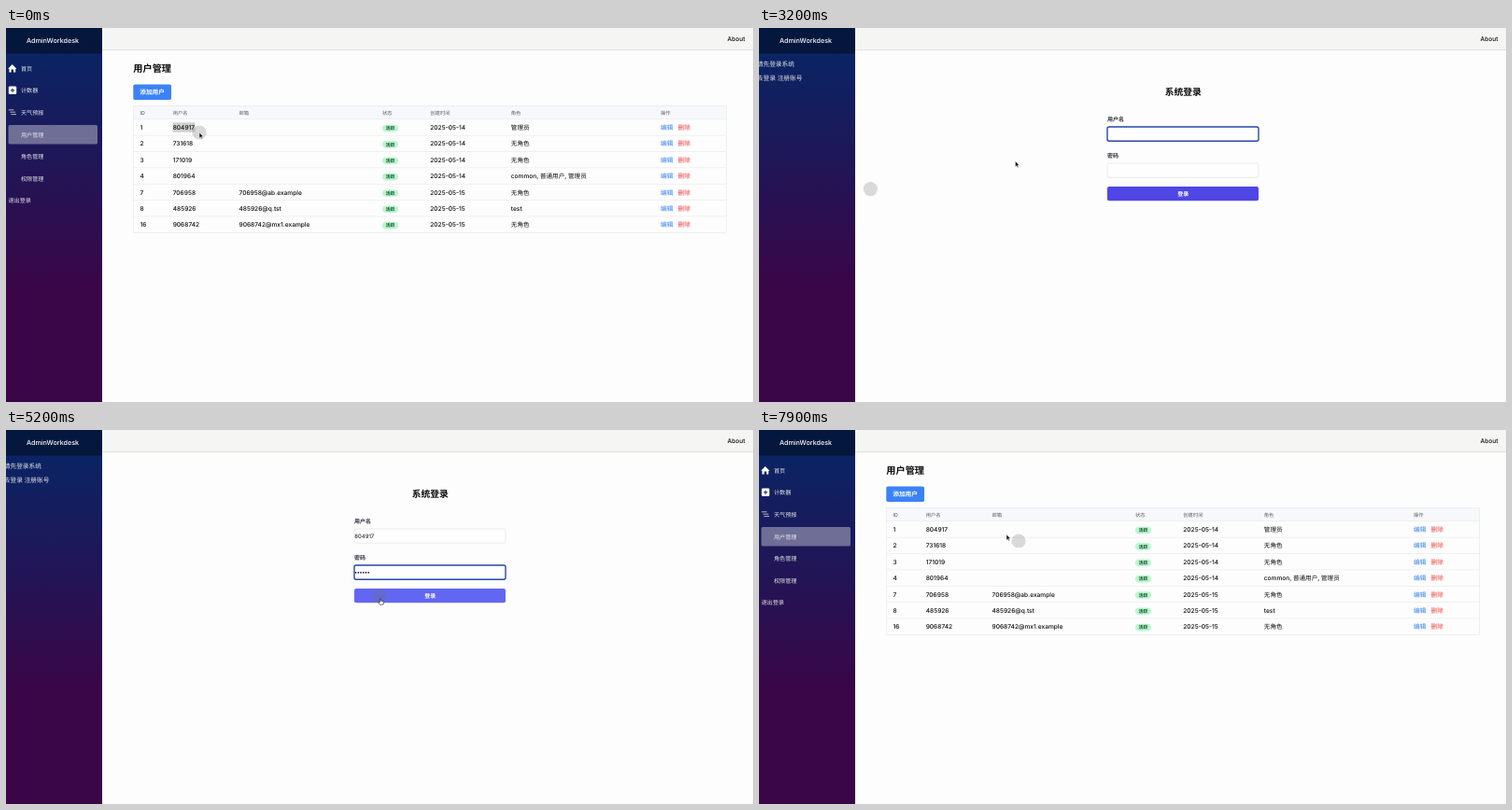
An HTML page for the animation above (8000 ms loop, 800 by 401 pixels).

```html
<!DOCTYPE html>
<html lang="zh-CN">
<head>
<meta charset="utf-8">
<title>用户管理</title>
<style>
  html, body { margin: 0; width: 100%; height: 100%; overflow: hidden; background: #fdfdfd; }
  svg { display: block; width: 800px; height: 401px; }
  text {
    font-family: Inter, "Noto Sans CJK SC", "Noto Sans CJK", sans-serif;
    text-rendering: geometricPrecision;
    white-space: pre;
  }
</style>
</head>
<body>
<svg id="stage" viewBox="0 0 800 401" xmlns="http://www.w3.org/2000/svg"></svg>
<script>
const LOOP = 8000;
const LOGIN_AT = 3000, HOME_AT = 5500, USERS_AT = 7500;
const INK = '#0c0c0e', LINE = '#e5e7eb', PALE = '#e6e6ea';
const ACCOUNT = '804917';

const stage = document.getElementById('stage');

// Text is placed by the vertical middle of its line.
const text = (x, mid, size, str, fill = INK, weight = 500, more = '') =>
  `<text x="${x}" y="${(mid + size * .36).toFixed(2)}" font-size="${size}" fill="${fill}" font-weight="${weight}" ${more}>${str}</text>`;
const rect = (x, y, w, h, fill, more = '') =>
  `<rect x="${x}" y="${y}" width="${w}" height="${h}" fill="${fill}" ${more}/>`;
const path = (d, more) => `<path d="${d}" ${more}/>`;
const group = (id, body) => `<g id="${id}">${body}</g>`;
const middle = 'text-anchor="middle"';

const navItems = [
  { label: '首页', link: '' },
  { label: '计数器', link: 'counter' },
  { label: '天气预报', link: 'weather' },
  { label: '用户管理', link: 'admin/users' },
  { label: '角色管理', link: 'admin/roles' },
  { label: '权限管理', link: 'admin/perms' },
  { label: '退出登录', link: 'auth/logout' }
];
const navMid = i => 43.5 + 23.6 * i;

function frameParts() {
  return `<defs><linearGradient id="side" x1="0" y1="0" x2="0" y2="1">
      <stop offset="0" stop-color="#052767"/><stop offset=".7" stop-color="#3a0647"/>
    </linearGradient></defs>` +
    rect(0, 0, 800, 401, '#fdfdfd') +
    rect(103, 0, 697, 23, '#f5f5f4') +
    rect(103, 23, 697, .7, '#d6d5d5') +
    text(791.5, 11.7, 6.6, 'About', INK, 500, 'text-anchor="end"') +
    rect(0, 0, 103, 401, 'url(#side)') +
    rect(0, 0, 103, 27.5, '#000', 'fill-opacity=".4"') +
    text(50, 13, 7.2, 'AdminWorkdesk', '#fff', 500, middle);
}

function navParts() {
  const icons =
    path('M2.2 43.4L6.7 39L11.2 43.4L10.2 44V47.4H8V44.4H5.6V47.4H3.4V44Z', 'fill="#fff"') +
    rect(2.8, 62.6, 8.4, 8.4, '#fff', 'rx="1.2"') +
    path('M7 64.7V68.9M4.9 66.8H9.1', 'stroke="#10205a" stroke-width="1"') +
    path('M2.8 87.8H8.4M4.4 90.2H10.2M5.4 92.6H11', 'stroke="#c4c6d2" stroke-width=".9"');
  const labels = navItems.map((item, i) =>
    text(i === 6 ? 2.5 : 16, navMid(i), 6.1, item.label, '#e6e6e8')).join('');
  return rect(2.5, 0, 95.5, 20.4, '#fff', 'rx="1.6" id="hover" fill-opacity=".1"') +
    rect(2.5, 0, 95.5, 20.4, '#fff', 'rx="1.6" id="active" fill-opacity=".37"') +
    icons + labels;
}

function usersParts() {
  const cols = [143.5, 178.7, 249.5, 403, 454.3, 540.8, 701];
  const heads = ['ID', '用户名', '邮箱', '状态', '创建时间', '角色', '操作'];
  const rows = [
    [1, ACCOUNT, '', 14, '管理员'],
    [2, '731618', '', 14, '无角色'],
    [3, '171019', '', 14, '无角色'],
    [4, '801964', '', 14, 'common, 普通用户, 管理员'],
    [7, '706958', '706958@ab.example', 15, '无角色'],
    [8, '485926', '485926@q.tst', 15, 'test'],
    [16, '9068742', '9068742@mx1.example', 15, '无角色']
  ];
  const size = 6.6;
  let out = text(136.3, 43.7, 10.2, '用户管理', INK, 700) +
    rect(136.3, 60.5, 40.7, 16.5, '#3b82f6', 'rx="1.8"') +
    text(156.6, 68.8, 6.7, '添加用户', '#fff', 600, middle) +
    rect(136.5, 83.5, 635, 14, '#f7f8fb') +
    rect(136.5, 83.5, 635, 136, 'none', `stroke="${LINE}" stroke-width=".6"`) +
    heads.map((h, i) => text(cols[i], 91, 5.3, h, '#5c626e', 500)).join('') +
    rect(178.5, 101.3, 24, 10.4, '#d0d0d0', 'id="selection"');
  rows.forEach(([id, name, mail, day, role], i) => {
    const y = 106.7 + 17.36 * i;
    out += rect(136.5, y - 9.2, 635, .6, LINE) +
      text(cols[0], y, size, id) +
      text(cols[1], y, size, name) +
      text(cols[2], y, size, mail) +
      rect(cols[3], y - 3, 17, 7.6, '#bbf7d0', 'rx="3.8"') +
      text(cols[3] + 8.5, y + .8, 5, '活跃', '#14532d', 600, middle) +
      text(cols[4], y, size, '2025-05-' + day) +
      text(cols[5], y, size, role) +
      text(cols[6], y, 6.7, '编辑', '#2f7df0') +
      text(719.5, y, 6.7, '删除', '#ee4040');
  });
  return out;
}

function loginParts() {
  const box = (id, y) => rect(373, y, 162, 15.2, '#fefefe', `rx="2" id="${id}"`);
  let dots = '';
  for (let i = 0; i < 6; i++) dots += `<circle class="dot" cx="${374.6 + 2.72 * i}" cy="152.8" r=".85" fill="${INK}"/>`;
  return text(454.3, 68.6, 9.8, '系统登录', INK, 700, middle) +
    text(373, 97.7, 6, '用户名', '#2a303c', 600) +
    text(373, 136.5, 6, '密码', '#2a303c', 600) +
    box('nameBox', 106) + box('passBox', 145) +
    text(373.3, 113.7, 6, '', INK, 400, 'id="typed"') + dots +
    rect(394.4, 110.2, .6, 7, INK, 'id="caret"') +
    rect(373, 170, 162, 15.2, '#4f46e5', 'rx="2" id="submit"') +
    text(454.2, 177.8, 6, '登录', '#fff', 600, middle);
}

const guestParts = () =>
  text(-2.2, 38.7, 6.7, '请先登录系统', '#e6e6e8') +
  text(-2.2, 54, 6.7, '去登录 注册账号', '#e6e6e8');

const homeParts = () =>
  rect(116.5, 23.6, 675, 24, '#d1fae0', 'rx="2" stroke="#92e6ae" stroke-width=".8"') +
  text(124, 35.7, 6.7, '您有权限访问客户数据。');

const statusParts = () =>
  rect(-3, 393, 70, 10, '#dcdedc', 'rx="1.6" stroke="#b4b4b4" stroke-width=".5"') +
  text(-1, 397, 5, '', '#4a4a4a', 400, 'id="address"');

const pointerParts = () =>
  '<circle id="halo" r="7.6" fill="#707070" fill-opacity=".25"/>' +
  group('arrow', path('M0 0V6.2L1.5 4.9L2.5 7.1L3.5 6.7L2.5 4.5H4.4Z',
    'fill="#111" stroke="#fff" stroke-width=".5"')) +
  group('hand', path('M-.6 0Q0 -.7 .6 0V2.2L3 2.8Q3.7 3.2 3.5 4L2.9 6.2H-.6L-2.4 3.7Q-2.2 2.8 -.6 3.8Z',
    'fill="#fff" stroke="#111" stroke-width=".6"')) +
  group('beam', path('M-1.2 -3Q0 -3 0 -2.3V2.3Q0 3 -1.2 3M1.2 -3Q0 -3 0 -2.3M0 2.3Q0 3 1.2 3',
    'fill="none" stroke="#222" stroke-width=".7"'));

stage.innerHTML = frameParts() + group('nav', navParts()) + group('guest', guestParts()) +
  group('users', usersParts()) + group('login', loginParts()) + group('home', homeParts()) +
  group('status', statusParts()) + pointerParts();

const el = {};
stage.querySelectorAll('[id]').forEach(n => el[n.id] = n);
const dots = [...stage.querySelectorAll('.dot')];

// Pointer path: time, x, y
const trail = [
  [0, 207, 112], [500, 207, 112], [1000, 198, 116], [1500, 186, 126], [1850, 150, 150],
  [2200, 44, 187], [3000, 44, 187], [3350, 424, 114], [3700, 424, 114], [3800, 420, 120.5],
  [4000, 408, 152], [4800, 404, 153], [5100, 400, 178], [5200, 401, 181], [5450, 401, 181],
  [5780, 214, 108], [6500, 214, 108], [7000, 36, 117], [7500, 36, 117],
  [7800, 278, 119], [7900, 265, 112], [8000, 258, 109]
];

function pointerAt(t) {
  t = Math.max(0, t);
  const i = Math.max(1, trail.findIndex(p => p[0] > t));
  const [t0, x0, y0] = trail[i - 1], [t1, x1, y1] = trail[i];
  const u = (t - t0) / (t1 - t0), k = u * u * (3 - 2 * u);
  return [x0 + (x1 - x0) * k, y0 + (y1 - y0) * k];
}

const show = (node, on) => node.setAttribute('display', on ? 'inline' : 'none');
const move = (node, [x, y]) => node.setAttribute('transform', `translate(${x.toFixed(2)} ${y.toFixed(2)})`);
const typedCount = (t, start, step) => Math.max(0, Math.min(6, Math.floor((t - start) / step) + 1));

function outline(node, focused) {
  node.setAttribute('stroke', focused ? '#2846a6' : PALE);
  node.setAttribute('stroke-width', focused ? 1.4 : .8);
}

function drawNav(scene, x, y) {
  const over = scene === 'login' || x < 2 || x > 98 ? -1
    : navItems.findIndex((_, i) => Math.abs(y - navMid(i)) <= 10.2);
  const active = scene === 'home' ? 0 : 3;
  el.active.setAttribute('y', navMid(active) - 10.2);
  show(el.hover, over >= 0 && over !== active);
  if (over >= 0) {
    el.hover.setAttribute('y', navMid(over) - 10.2);
    el.address.textContent = 'devserver:7340/' + navItems[over].link;
  }
  show(el.status, over >= 0);
  return over >= 0;
}

function drawLogin(t, x, y) {
  const inside = x > 373 && x < 535;
  const onPass = t >= 4000;
  const onButton = inside && y > 170 && y < 186;
  const count = typedCount(t, 3250, 80), passCount = typedCount(t, 4200, 100);
  el.typed.textContent = ACCOUNT.slice(0, count);
  dots.forEach((d, i) => show(d, i < passCount));
  outline(el.nameBox, !onPass);
  outline(el.passBox, onPass);
  el.caret.setAttribute('x', onPass ? 374 + 2.72 * passCount : 373.6 + 3.5 * count);
  el.caret.setAttribute('y', onPass ? 149.3 : 110.2);
  show(el.caret, t % 1000 >= 500);
  el.submit.setAttribute('fill', onButton ? '#6366f1' : '#4f46e5');
  if (onButton) return 'hand';
  return inside && (y > 105 && y < 122 || y > 144 && y < 161) ? 'beam' : 'arrow';
}

function draw(t) {
  const scene = t < LOGIN_AT || t >= USERS_AT ? 'users' : t < HOME_AT ? 'login' : 'home';
  const spot = pointerAt(t), [x, y] = spot;
  for (const id of ['users', 'login', 'home']) show(el[id], id === scene);
  show(el.nav, scene !== 'login');
  show(el.guest, scene === 'login');

  show(el.selection, t < LOGIN_AT);
  el.selection.setAttribute('fill', t < 500 ? '#d0d0d0' : '#b3d7fe');

  let kind = drawNav(scene, x, y) ? 'hand' : 'arrow';
  if (scene === 'login') kind = drawLogin(t, x, y);
  for (const id of ['arrow', 'hand', 'beam']) {
    show(el[id], id === kind);
    move(el[id], spot);
  }
  // The halo trails the pointer.
  move(el.halo, pointerAt(t - 100));
}

const began = performance.now();
function tick() {
  const t = (performance.now() - began) % LOOP;
  draw(Math.floor(t / 100) * 100);
  requestAnimationFrame(tick);
}
tick();
</script>
</body>
</html>
```
